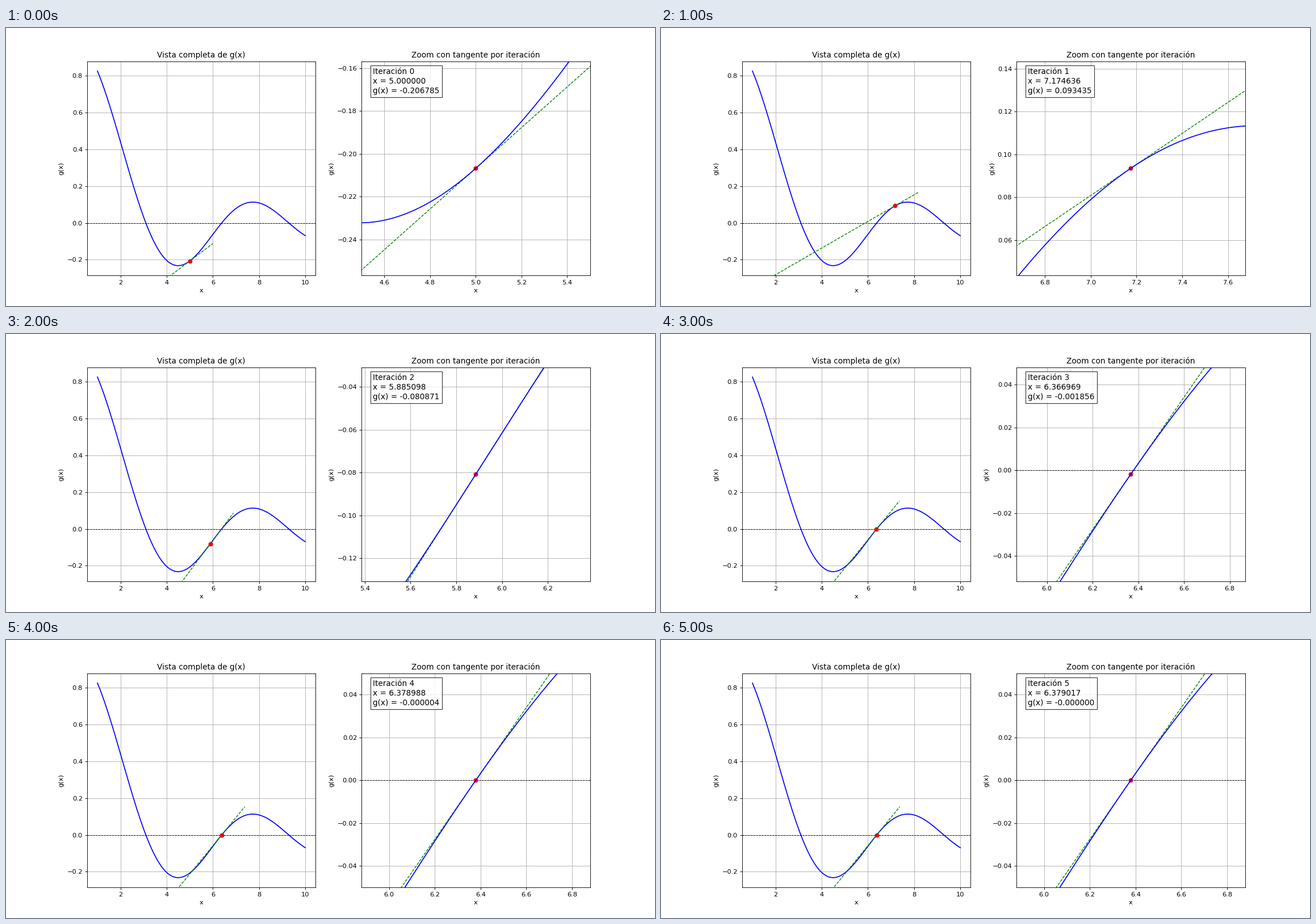
A matplotlib script that plays this animation: 1143x490 px, repeating every 6000 ms.

```python
import numpy as np
import matplotlib.pyplot as plt
from matplotlib.animation import FuncAnimation

DPI = 81.65
WIDTH, HEIGHT = 1143, 490
STEPS = 6
HALF_X, HALF_Y = 0.5, 0.05


def g(x):
    return np.sin(x) / x - 0.015


def slope(x):
    return np.cos(x) / x - np.sin(x) / x**2


def newton(x, count):
    points = [x]
    while len(points) < count:
        x = x - g(x) / slope(x)
        points.append(x)
    return points


def style(ax, title):
    ax.set_title(title)
    ax.set_xlabel("x")
    ax.set_ylabel("g(x)")
    ax.grid(True)
    ax.axhline(0, color="black", linestyle="--", linewidth=0.8)


def add_markers(ax):
    point, = ax.plot([], [], "ro")
    tangent, = ax.plot([], [], "g--", linewidth=1.2)
    return point, tangent


plt.rcParams["font.family"] = "DejaVu Sans"
# The small margin keeps the pixel size from being truncated.
fig, (full, zoom) = plt.subplots(
    1, 2, dpi=DPI, figsize=((WIDTH + 0.01) / DPI, (HEIGHT + 0.01) / DPI))
# A tenth of a pixel up and left, so spines and grid snap to the right pixel.
fig.subplots_adjust(left=0.1249, right=0.8999, bottom=0.1102, top=0.8802)

xs = np.linspace(1, 10, 500)
full.plot(xs, g(xs), "b")
style(full, "Vista completa de g(x)")
style(zoom, "Zoom con tangente por iteración")

markers = [add_markers(full), add_markers(zoom)]
curve, = zoom.plot([], [], "b")
label = zoom.text(0.05, 0.97, "", transform=zoom.transAxes, fontsize=12,
                  va="top", linespacing=1.27,
                  bbox=dict(facecolor="white", alpha=0.8))
roots = newton(5.0, STEPS)


def update(i):
    x = roots[i]
    y = g(x)
    tx = np.array([1, x + 1])
    for point, tangent in markers:
        point.set_data([x], [y])
        tangent.set_data(tx, y + slope(x) * (tx - x))

    near = np.linspace(x - HALF_X, x + HALF_X, 300)
    curve.set_data(near, g(near))
    zoom.set_xlim(x - HALF_X, x + HALF_X)
    zoom.set_ylim(y - HALF_Y, y + HALF_Y)
    label.set_text(f"Iteración {i}\nx = {x:.6f}\ng(x) = {y:.6f}")
    return []


anim = FuncAnimation(fig, update, frames=STEPS, interval=1000, repeat=True,
                     repeat_delay=0, init_func=lambda: update(0))
plt.show()
```
